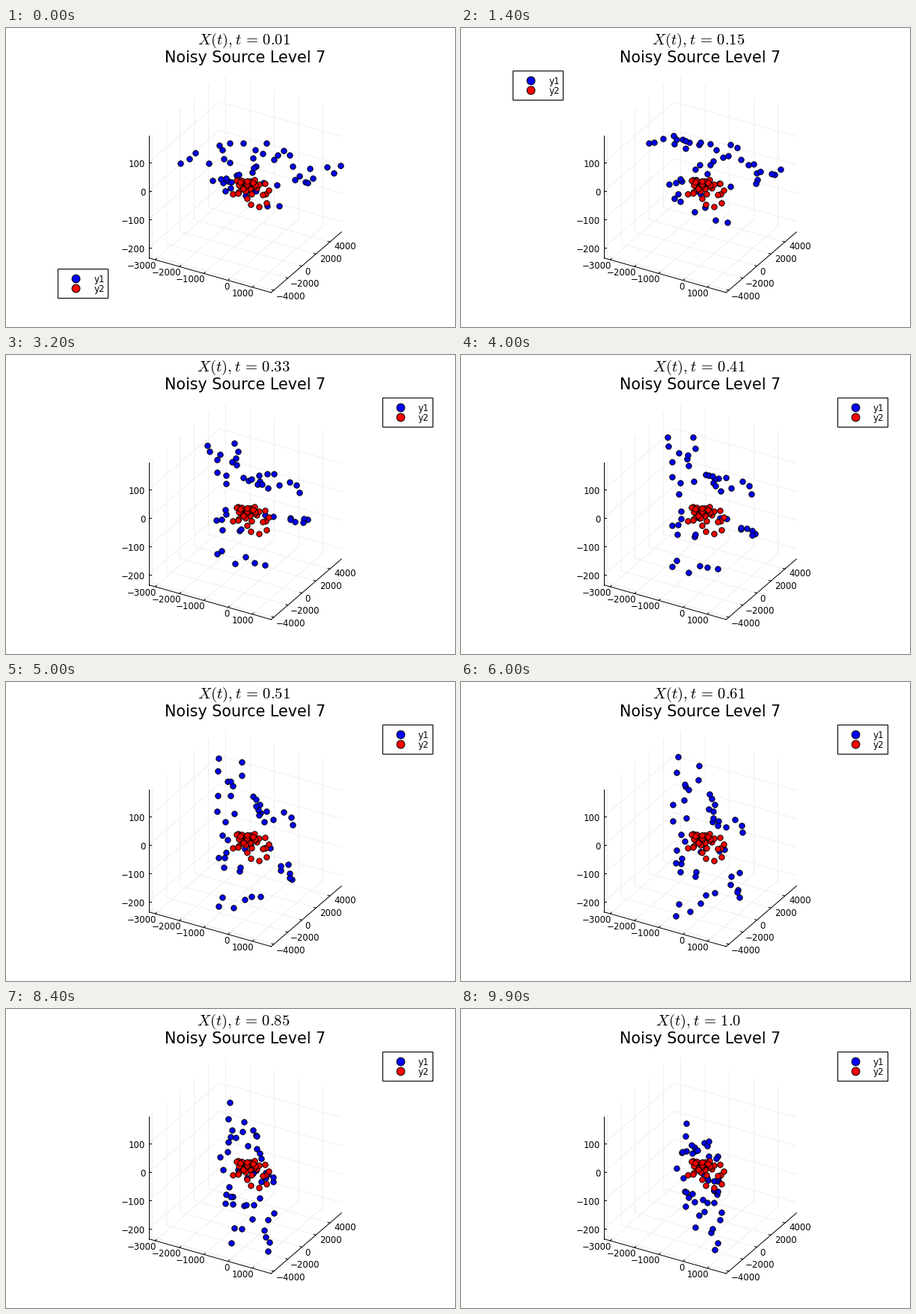
A matplotlib script that plays this animation: 600 by 400 pixels, repeating every 10 s.

```python
import numpy as np
import matplotlib.pyplot as plt
from matplotlib.animation import FuncAnimation
from matplotlib.patches import Rectangle

W, H, DPI, FRAMES = 600, 400, 100, 100
PT = 72 / DPI
GRID = "#efefef"
rng = np.random.default_rng(7)

plt.rcParams["font.family"] = "DejaVu Sans"
plt.rcParams["mathtext.fontset"] = "cm"

fig = plt.figure(figsize=(W / DPI, H / DPI), dpi=DPI, facecolor="white")
ax = fig.add_axes([0, 0, 1, 1])
ax.set(xlim=(0.7, W + 0.7), ylim=(H + 0.3, 0.3))
ax.axis("off")


def line(p, q, color="black", width=1.0):
    ax.plot([p[0], q[0]], [p[1], q[1]], color=color, lw=width * PT, zorder=1)


def label(x, y, s, ha, size=11.8, va="center_baseline", z=1):
    return ax.text(x, y, s, ha=ha, va=va, fontsize=size * PT, zorder=z)


def number(x, y, n, ha):
    label(x, y, str(n).replace("-", "−"), ha)


def dots(color, size, z):
    return ax.plot([], [], "o", color=color, ms=size * PT, mec="black",
                   mew=1.0 * PT, zorder=z)[0]


# Box of the 3D axes: edge vectors on screen
A = np.array([192.0, 308.0])
EX, EY, UP = np.array([163, 46.2]), np.array([94, -81]), np.array([0, -164])
B, D = A + EX, A + EY

for i in range(5):
    px, py = (8 + 32.45 * i) / 163 * EX, (3.6 + 18.75 * i) / 94 * EY
    line(A + px, D + px, GRID)
    line(D + px, D + px + UP, GRID)
    line(A + py, B + py, GRID)
    line(A + py, A + py + UP, GRID)
    line(A + px, A + px + [2, -1.7])
    line(B + py, B + py + [-2.8, -0.8])
    number(202 + 32.5 * i, 317.3 + 9.25 * i, 1000 * (i - 3), "right")
    number(361.5 + 19.3 * i, 358.3 - 16.7 * i, 2000 * (i - 2), "left")
for i in range(4):
    h = np.array([0, -14 - 38 * i])
    line(A + h, D + h, GRID)
    line(D + h, D + EX + h, GRID)
    line(A + h, A + h + [2.5, 0])
    number(187, 295.3 - 38 * i, 100 * (i - 2), "right")
line(A, A + UP)
line(A, B)
line(B, B + EY)

label(320.5, 46.7, "Noisy Source Level 7", "center", 20.7, "baseline")
clock = label(318.3, 22, "", "center", 20.7, "baseline")


def fan(count, first, last):
    """Blend two paths of (start, middle, end) points into a loose family."""
    w = np.linspace(0, 1, count)[:, None, None]
    noise = rng.normal(0, 7, (count, 3, 2)) * np.sin(np.pi * w)
    return np.array(first) * (1 - w) + np.array(last) * w + noise


paths = np.concatenate([
    fan(6, [(448, 184), (394, 239), (340, 322)], [(401, 206), (383, 232), (349, 272)]),
    fan(6, [(404, 207), (389, 186), (343, 248)], [(372, 164), (345, 165), (330, 226)]),
    fan(6, [(366, 238), (344, 286), (343, 230)], [(291, 207), (283, 283), (314, 292)]),
    fan(6, [(277, 204), (283, 228), (300, 244)], [(328, 218), (314, 240), (330, 259)]),
    fan(7, [(234, 181), (277, 110), (302, 153)], [(318, 154), (292, 186), (301, 264)]),
    fan(6, [(272, 181), (311, 110), (313, 185)], [(349, 154), (312, 169), (297, 191)]),
    fan(7, [(302, 206), (328, 160), (326, 179)], [(364, 170), (348, 182), (342, 200)]),
    fan(5, [(295, 201), (295, 209), (320, 214)], [(363, 210), (356, 219), (345, 225)]),
])


def glide(t):
    return np.stack([np.ones_like(t), t, t * t], -1)


def swing(t):
    return np.stack([np.ones_like(t), np.cos(3.6 * t), np.sin(3.6 * t)], -1)


# Sideways drift is quadratic; the vertical motion swings about a mean height
KEYS = np.array([0, 0.4, 0.99])
drift = np.linalg.solve(glide(KEYS), paths[:, :, 0].T)
sway = np.linalg.solve(swing(KEYS), paths[:, :, 1].T)

blue = dots("blue", 7.4, 3)
red = dots("red", 7.4, 4)
red.set_data(np.clip(rng.normal(326, 14, 44), 300, 352),
             np.clip(202 + rng.gamma(2, 6, 44), 201, 239))

box = Rectangle((0, 0), 67, 39, fc="white", ec="black", lw=1.1 * PT, zorder=5)
ax.add_patch(box)
entries = [(dots(c, 10.8, 6), label(0, 0, s, "left", z=6))
           for c, s in (("blue", "y1"), ("red", "y2"))]


def place_legend(x, y):
    box.set_xy((x, y))
    for n, (mark, text) in enumerate(entries):
        row = y + 13 + 13 * n
        mark.set_data([x + 24], [row])
        text.set_position((x + 48, row))


def draw(i):
    t = np.array(i / 100)
    clock.set_text(rf"$X(t), t\,=\,{(i + 1) / 100}$")
    blue.set_data(glide(t) @ drift, swing(t) @ sway)
    if i < 6:
        place_legend(70, 322)
    elif i < 23:
        place_legend(70, 57)
    else:
        place_legend(503.5, 57)
    return [clock, blue, box]


anim = FuncAnimation(fig, draw, frames=FRAMES, interval=100, repeat=True,
                     repeat_delay=0, blit=False)
plt.show()
```
